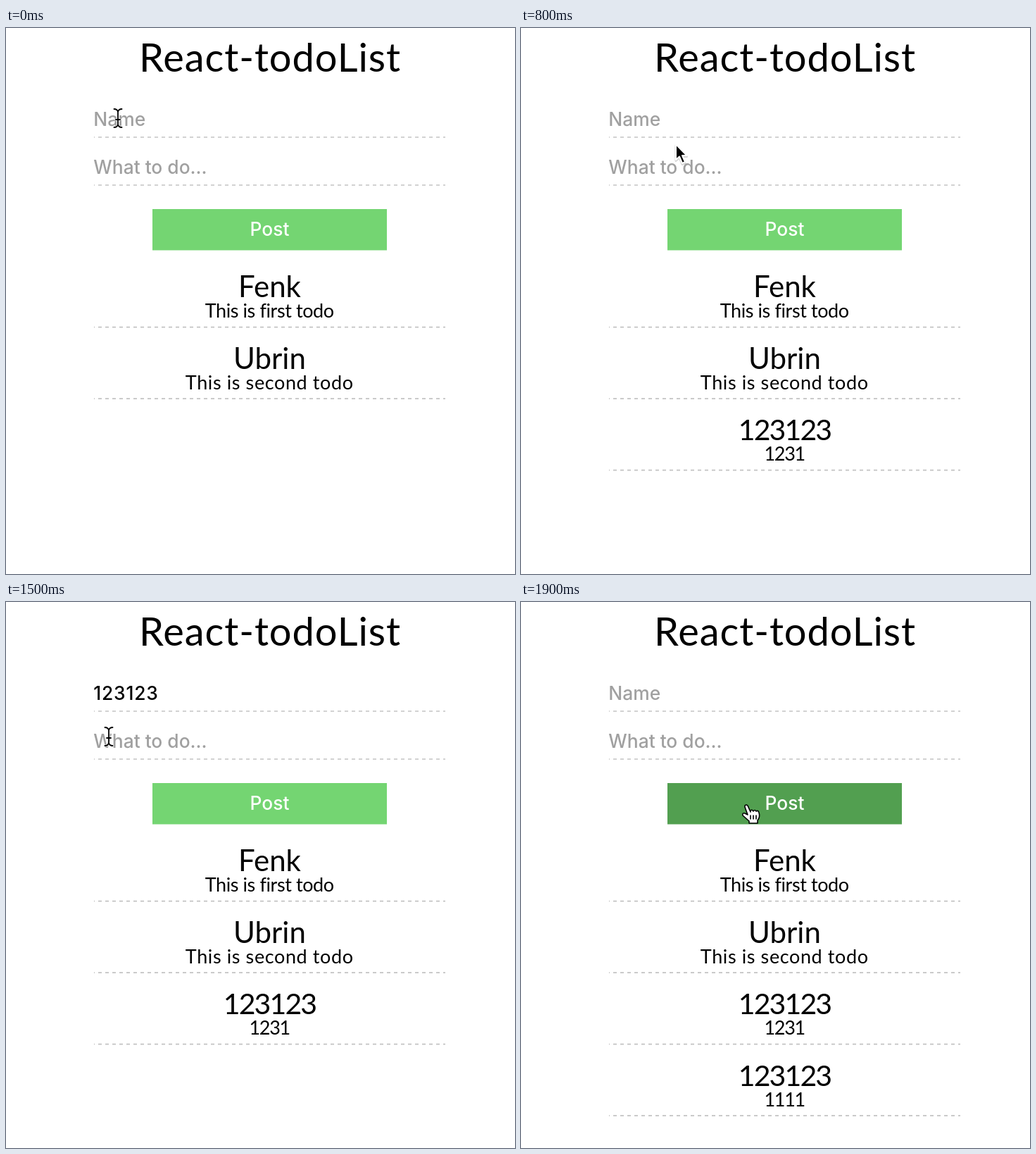
These frames come from a looping animation (723x775 px, 2 s). An HTML page:

```html
<!DOCTYPE html>
<html lang="en">
<head>
<meta charset="utf-8">
<title>React-todoList</title>
<style>
  html, body { margin: 0; width: 100%; height: 100%; overflow: hidden; background: #fff; }
  svg { display: block; width: 100%; height: 100%; }
  text { white-space: pre; }
  .round { font-family: Lato, sans-serif; text-anchor: middle; }
  .title { font-size: 56px; letter-spacing: .95px; }
  .name { font-size: 42px; }
  .todo { font-size: 27px; }
  .digits .name { font-size: 41px; letter-spacing: -1.9px; }
  .digits .todo { letter-spacing: -1.3px; }
  .tight .todo { letter-spacing: -.4px; }
  .loose .todo { letter-spacing: .6px; }
  .field, .post { font: 500 26.4px Inter, sans-serif; }
  .field { fill: #000; letter-spacing: .8px; }
  .hint { fill: #a0a0a0; letter-spacing: 0; }
  .post { fill: #fff; text-anchor: middle; }
  .rule { stroke: #c3c3c3; stroke-width: 1.7; stroke-dasharray: 5 5; stroke-dashoffset: 4; }
</style>
</head>
<body>
<svg id="stage" viewBox="0 0 723 775"></svg>
<script>
const NS = 'http://www.w3.org/2000/svg';
const stage = document.getElementById('stage');

function add(tag, attrs, parent = stage, content = '') {
  const el = document.createElementNS(NS, tag);
  for (const key in attrs) el.setAttribute(key, attrs[key]);
  el.textContent = content;
  parent.appendChild(el);
  return el;
}

const rule = (y, parent) => add('line', { class: 'rule', x1: 125, x2: 624, y1: y, y2: y }, parent);

add('text', { class: 'round title', x: 375, y: 62 }, stage, 'React-todoList');

function makeField(y, hint) {
  const x = 124.3;
  rule(y + 16);
  const label = add('text', { x, y });
  const caret = add('rect', { y: y - 25, width: 1.6, height: 30 });
  return (value, focused) => {
    label.textContent = value || hint;
    label.setAttribute('class', value ? 'field' : 'field hint');
    caret.setAttribute('x', value ? x + label.getComputedTextLength() : x);
    caret.setAttribute('visibility', focused ? 'visible' : 'hidden');
  };
}

const setName = makeField(139, 'Name');
const setTask = makeField(207, 'What to do...');

const button = add('rect', { x: 208, y: 257, width: 333, height: 58.5 });
add('text', { class: 'post', x: 374.5, y: 295 }, stage, 'Post');

const items = [
  ['Fenk', 'This is first todo', 'tight'],
  ['Ubrin', 'This is second todo', 'loose'],
  ['123123', '1231', 'digits'],
  ['123123', '1111', 'digits']
].map(([name, todo, style], i) => {
  const g = add('g', { class: style, transform: `translate(0 ${i * 101.5})` });
  const label = add('g', {}, g);
  add('text', { class: 'round name', x: 374.5, y: 382 }, label, name);
  add('text', { class: 'round todo', x: 374.2, y: 411 }, label, todo);
  rule(424.7, g);
  return { g, label };
});

// Pointer shapes, each drawn around its hot spot.
const pointers = {
  beam: add('g', { fill: 'none', 'stroke-linecap': 'round' }),
  arrow: add('g', { 'stroke-linejoin': 'round' }),
  hand: add('g', { 'stroke-linejoin': 'round', 'stroke-linecap': 'round' })
};

const beamPath = 'M-5.5-13Q-1-13 0-9Q1-13 5.5-13M0-9V9M-5.5 13Q-1 13 0 9Q1 13 5.5 13M-3 2H3';
add('path', { d: beamPath, stroke: '#fff', 'stroke-width': 3.6, 'stroke-opacity': .75 }, pointers.beam);
add('path', { d: beamPath, stroke: '#000', 'stroke-width': 1.8 }, pointers.beam);

const arrowPath = 'M0 0V22L5 17.5L9 27L13 25.2L9 16H15.5Z';
add('path', { d: arrowPath, transform: 'translate(0 1.5)', fill: '#000', opacity: .16, stroke: '#000', 'stroke-width': 3 }, pointers.arrow);
add('path', { d: arrowPath, stroke: '#fff', 'stroke-width': 2 }, pointers.arrow);

const handPath = 'M-2 1Q0-1 2 1L6 10V8Q8 6 10 9Q12 6 14 9Q17 7 18 11Q20 17 16 22V26H4V23L-5 15Q-6 11-2 12L2 14L-2 3Z';
add('path', { d: handPath, fill: '#fff', stroke: '#000', 'stroke-width': 1.6 }, pointers.hand);
add('path', { d: 'M6 15V20M10 15V20M14 15V20', stroke: '#000', 'stroke-width': 1.6 }, pointers.hand);

// name, task, caret field, pointer, x, y, item count
const steps = [
  ['', '', '', 'beam', 159, 128, 2],
  ['', '', 'name', 'beam', 159, 128, 2],
  ['123', '', 'name', '', 0, 0, 2],
  ['123123', '', 'name', 'arrow', 238, 22, 2],
  ['123123', '', 'task', 'beam', 278, 207, 2],
  ['123123', '1231', 'task', 'beam', 285, 222, 2],
  ['', '', '', 'arrow', 474, 567, 3],
  ['', '', '', 'arrow', 300, 50, 3],
  ['', '', '', 'arrow', 220, 165, 3],
  ['', '', 'name', 'beam', 168, 130, 3],
  ['123', '', 'name', '', 0, 0, 3],
  ['123123', '', 'name', '', 0, 0, 3],
  ['123123', '', 'name', 'arrow', 187, 236, 3],
  ['123123', '', 'name', 'beam', 154, 201, 3],
  ['123123', '', 'task', 'beam', 146, 191, 3],
  ['123123', '', '', 'beam', 146, 191, 3],
  ['123123', '1111', 'task', '', 0, 0, 3],
  ['123123', '1111', 'task', 'hand', 318, 288, 3],
  ['123123', '1111', '', 'hand', 318, 288, 4],
  ['', '', '', 'hand', 320, 288, 4]
];

let last = -1;

function draw(time) {
  const step = Math.floor(time % 2000 / 100);
  if (step === last) return;
  last = step;
  const [name, task, focus, pointer, x, y, count] = steps[step];
  setName(name, focus === 'name');
  setTask(task, focus === 'task');
  button.setAttribute('fill', pointer === 'hand' ? '#529f50' : '#74d572');
  items.forEach(({ g, label }, i) => {
    g.setAttribute('visibility', i < count ? 'visible' : 'hidden');
    // The last item is still fading in while the fields hold their text.
    label.setAttribute('opacity', i === 3 && name ? .5 : 1);
  });
  for (const kind in pointers) {
    pointers[kind].setAttribute('visibility', kind === pointer ? 'visible' : 'hidden');
    pointers[kind].setAttribute('transform', `translate(${x} ${y})`);
  }
}

const start = performance.now();
function tick() {
  draw(performance.now() - start);
  requestAnimationFrame(tick);
}
tick();
</script>
</body>
</html>
```
